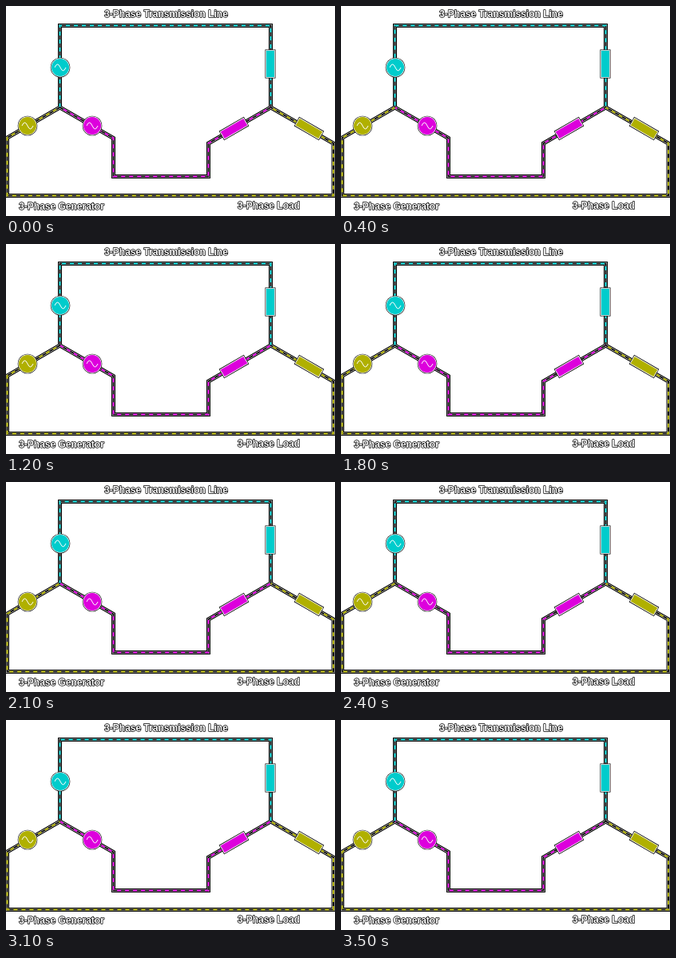
An HTML page that plays this animation: 412 px wide and 263 px high, repeating every 3600 ms.

```html
<!DOCTYPE html>
<html lang="en">
<meta charset="utf-8">
<title>Three-phase transmission</title>
<style>
  html, body { margin: 0; width: 100%; height: 100%; overflow: hidden; background: #fff }
  svg { display: block; width: 412px; height: 263px }
  path { fill: none }
  text { font: bold 12px "Liberation Sans", Arial, sans-serif; text-anchor: middle; fill: #fff;
         stroke: #000; stroke-width: 1.4; stroke-linejoin: round; paint-order: stroke }
</style>
<svg viewBox="0 0 412 263">
  <g id="rims"></g>
  <g id="halos"></g>
  <g id="cores"></g>
  <g id="parts"></g>
  <text x="200.5" y="14">3-Phase Transmission Line</text>
  <text x="69.5" y="255">3-Phase Generator</text>
  <text x="329" y="254">3-Phase Load</text>
</svg>
<script>
const LOOP = 3600, STEP = 100, SWING = 10;

const phases = [
  { color: '#00cccc', wire: 'M67.5 127V24.5H331.5V127', source: [68, 77], load: [331, 72.5, 90] },
  { color: '#dd00dd', wire: 'M67.5 127L134.5 165.5V213.5H253.5V172L331.5 127', source: [108, 150], load: [285.5, 153.5, -30] },
  { color: '#b0b000', wire: 'M67.5 127L1.5 165V237.5H410V172L331.5 127', source: [27, 150], load: [379.5, 153.5, 30] }
];

function add(layer, tag, attrs) {
  const el = document.createElementNS('http://www.w3.org/2000/svg', tag);
  for (const key in attrs) el.setAttribute(key, attrs[key]);
  return document.getElementById(layer).appendChild(el);
}

for (const p of phases) {
  const line = (layer, stroke, width) =>
    add(layer, 'path', { d: p.wire, stroke, 'stroke-width': width });
  line('rims', '#000', 5);
  line('halos', '#fff', 3);
  line('cores', '#000', 2);
  p.flow = line('cores', p.color, 2);
  p.flow.setAttribute('stroke-dasharray', '5 5');

  // Each part has a black rim, a white gap and a coloured body
  const [x, y] = p.source;
  const disc = (r, fill) => add('parts', 'circle', { cx: x, cy: y, r, fill });
  disc(12.3, '#000');
  disc(11.7, '#fff');
  disc(11, p.color);
  add('parts', 'path', { d: `M${x - 7} ${y}q3.5 -8 7 0t7 0`, stroke: '#fff', 'stroke-width': 1 });

  const [lx, ly, turn] = p.load;
  const bar = (w, h, fill) => add('parts', 'rect', {
    x: -w / 2, y: -h / 2, width: w, height: h, fill,
    transform: `translate(${lx} ${ly}) rotate(${turn})`
  });
  bar(36, 13, '#000');
  bar(34.6, 11.6, '#fff');
  bar(33, 10, p.color);
}

function draw(now) {
  const t = Math.floor(now % LOOP / STEP) * STEP / LOOP;
  phases.forEach((p, i) => {
    const shift = SWING * Math.cos(2 * Math.PI * (t - i / 3));
    p.flow.setAttribute('stroke-dashoffset', shift.toFixed(2));
  });
  requestAnimationFrame(draw);
}
draw(performance.now());
</script>
</html>
```
